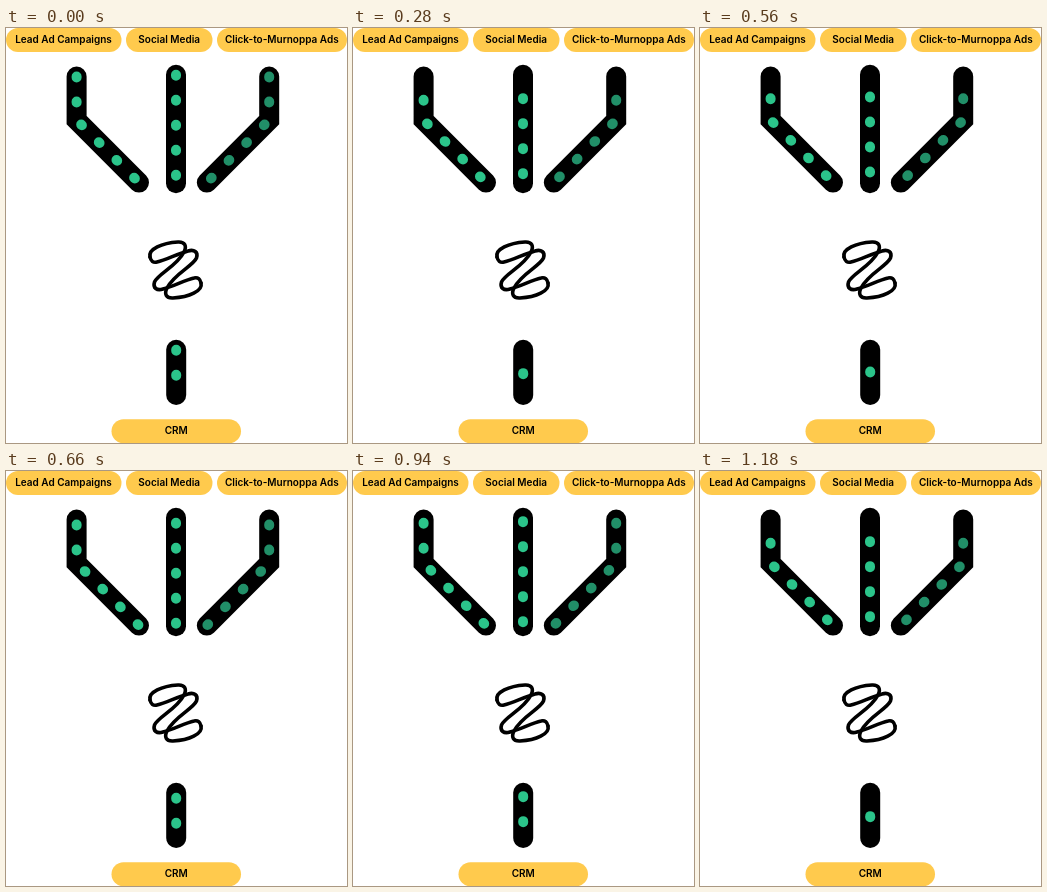
An HTML page for the animation above (1200 ms loop, 341 px wide and 415 px high).

```html
<!DOCTYPE html>
<html lang="en">
<head>
<meta charset="utf-8">
<title>Lead funnel</title>
<style>
  html, body { margin: 0; width: 100%; height: 100%; overflow: hidden; background: #fff; }
  svg { display: block; width: 341px; height: 415px; }
  path { fill: none; }
  .lane { stroke: #000; stroke-width: 20; stroke-linecap: round; }
  .dots {
    stroke: #2bc48a; stroke-width: 10; stroke-linecap: round;
    stroke-dasharray: 1 24;
    animation: flow 300ms steps(15) infinite;
  }
  .dim { stroke: #218f68; }
  .knot { stroke: #000; stroke-width: 3.6; stroke-linecap: round; stroke-linejoin: round; }
  .pill { fill: #ffca4d; }
  text { font: 600 10px Inter, "Open Sans", sans-serif; text-anchor: middle; fill: #000; }
  @keyframes flow { to { stroke-dashoffset: -25; } }
</style>
</head>
<body>
<svg viewBox="0 0 341 415">
  <defs>
    <path id="left" d="M70.6 48.5V92L133 154.6"/>
    <path id="mid" d="M170 46.8V155.3"/>
    <path id="right" d="M263.2 48.5V92L200.8 154.6"/>
    <path id="out" d="M170.2 321.8V367"/>
    <path id="half" d="M144 229C142 221 156 215 172 214C179 213.6 181 218 178 224C171 238 152 246 148.5 254C146.5 260 151 263 157 261C168 258 179 252 188 250C192 249 194.2 251.2 195 255"/>
  </defs>

  <g class="lane">
    <use href="#left"/><use href="#mid"/><use href="#right"/><use href="#out"/>
  </g>
  <use class="dots" href="#left"/>
  <use class="dots" href="#mid"/>
  <use class="dots dim" href="#right"/>
  <use class="dots" href="#out"/>

  <g class="knot">
    <use href="#half"/>
    <use href="#half" transform="rotate(180 169.5 242)"/>
  </g>

  <g class="pill">
    <rect width="115.5" height="24" rx="12"/>
    <rect x="120" width="86.5" height="24" rx="12"/>
    <rect x="211" width="130" height="24" rx="12"/>
    <rect x="105.5" y="391.3" width="129.5" height="24" rx="12"/>
  </g>
  <text x="57.5" y="15">Lead Ad Campaigns</text>
  <text x="163.2" y="15">Social Media</text>
  <text x="275.8" y="15">Click-to-Murnoppa Ads</text>
  <text x="170.2" y="406.3">CRM</text>
</svg>
</body>
</html>
```
